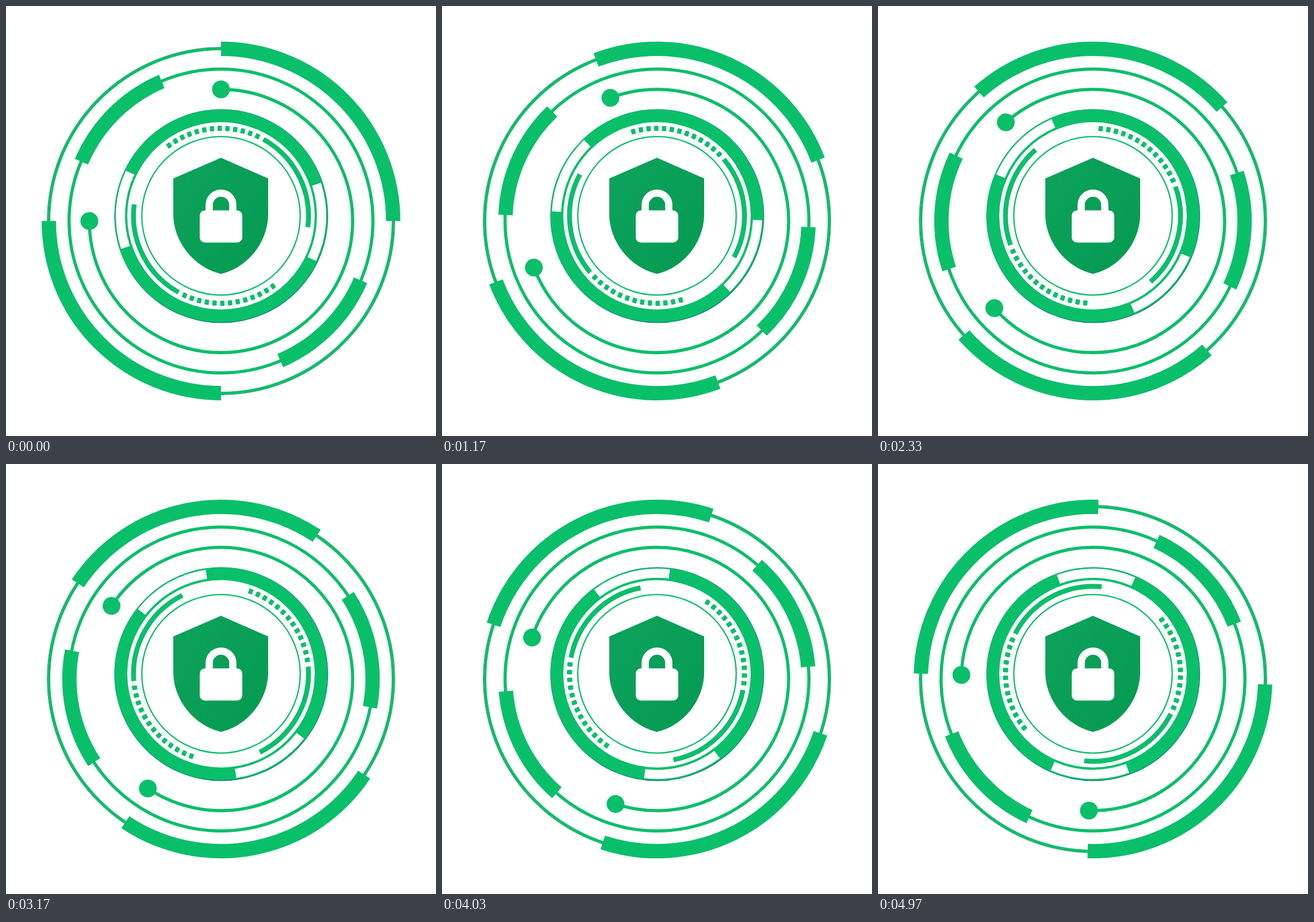
An HTML page for the animation above (5010 ms loop, 748 px wide and 748 px high).

```html
<!DOCTYPE html>
<html lang="en">
<head>
<meta charset="utf-8">
<title>Security shield</title>
<style>
html, body { margin: 0; width: 100%; height: 100%; overflow: hidden; background: #fff; }
svg { display: block; width: 100vw; height: 100vh; }
.line { fill: none; stroke: #0abf6a; }
.gap { fill: none; stroke: #fff; }
.rim { fill: none; stroke: #0a5a40; stroke-width: 1; }
</style>
</head>
<body>
<svg viewBox="0 0 748 748">
  <defs>
    <linearGradient id="shade" x1="0" y1="0" x2="1" y2="1">
      <stop offset="0" stop-color="#0ca35c"/>
      <stop offset="1" stop-color="#069a52"/>
    </linearGradient>
  </defs>

  <!-- Outer rings, turning counterclockwise -->
  <g transform="translate(374 374)">
    <circle class="rim" r="302.3" opacity=".75"/>
    <circle class="line" r="299.5" stroke-width="5"/>
    <circle class="line" r="264.3" stroke-width="5.5"/>
    <g id="outer" fill="#0abf6a">
      <circle cy="-229" r="15.5"/>
      <circle cx="-229" r="15.5"/>
    </g>
  </g>

  <!-- Inner ring, turning clockwise -->
  <g transform="translate(374 365)">
    <circle cx=".4" cy=".5" r="186" fill="#0a807a"/>
    <circle r="185.3" fill="#0abf6a"/>
    <circle r="163" fill="#fff"/>
    <circle class="line" r="137.8" stroke-width="2.3"/>
    <g id="inner" fill="#0abf6a"></g>
  </g>

  <path fill="url(#shade)" d="M374 264 456 300V362C456 410 421 455 374 466C327 455 291 410 291 362V300Z"/>
  <rect x="337" y="355.5" width="74" height="56" rx="9" fill="#fff"/>
  <path d="M353.5 360V346a20.5 20.5 0 0 1 41 0V360" fill="none" stroke="#fff" stroke-width="12.5"/>
</svg>
<script>
const outer = document.getElementById('outer');
const inner = document.getElementById('inner');

function add(parent, tag, attrs) {
  const el = document.createElementNS('http://www.w3.org/2000/svg', tag);
  for (const key in attrs) el.setAttribute(key, attrs[key]);
  parent.append(el);
}

function arc(parent, r, from, to, width, cls = 'line') {
  const point = deg => {
    const a = deg * Math.PI / 180;
    return `${r * Math.cos(a)} ${r * Math.sin(a)}`;
  };
  const large = to - from > 180 ? 1 : 0;
  add(parent, 'path', {
    class: cls,
    'stroke-width': width,
    d: `M${point(from)}A${r} ${r} 0 ${large} 1 ${point(to)}`
  });
}

arc(outer, 229, -90, 180, 5.5);
for (const half of [0, 180]) {
  arc(outer, 299.5, half - 90, half, 25);
  arc(outer, 263.7, half + 23, half + 67, 25);

  arc(inner, 175, half - 18.3, half + 25.4, 16, 'gap');
  arc(inner, 152.2, half - 61, half + 7.5, 8.5);
  for (let i = 0; i < 13; i++) {
    add(inner, 'rect', {
      x: 147.7, y: -3.8, width: 9, height: 7.6, rx: 1.2,
      transform: `rotate(${half - 126.4 + i * 5.08})`
    });
  }
}

const LOOP = 5010, STEP = 100 / 3, TURN = 90 / 152;
const start = performance.now();

function draw() {
  const t = (performance.now() - start) % LOOP;
  const angle = Math.min(149, Math.floor((t + 4) / STEP)) * TURN;
  outer.setAttribute('transform', `rotate(${-angle})`);
  inner.setAttribute('transform', `rotate(${angle})`);
  requestAnimationFrame(draw);
}
draw();
</script>
</body>
</html>
```
